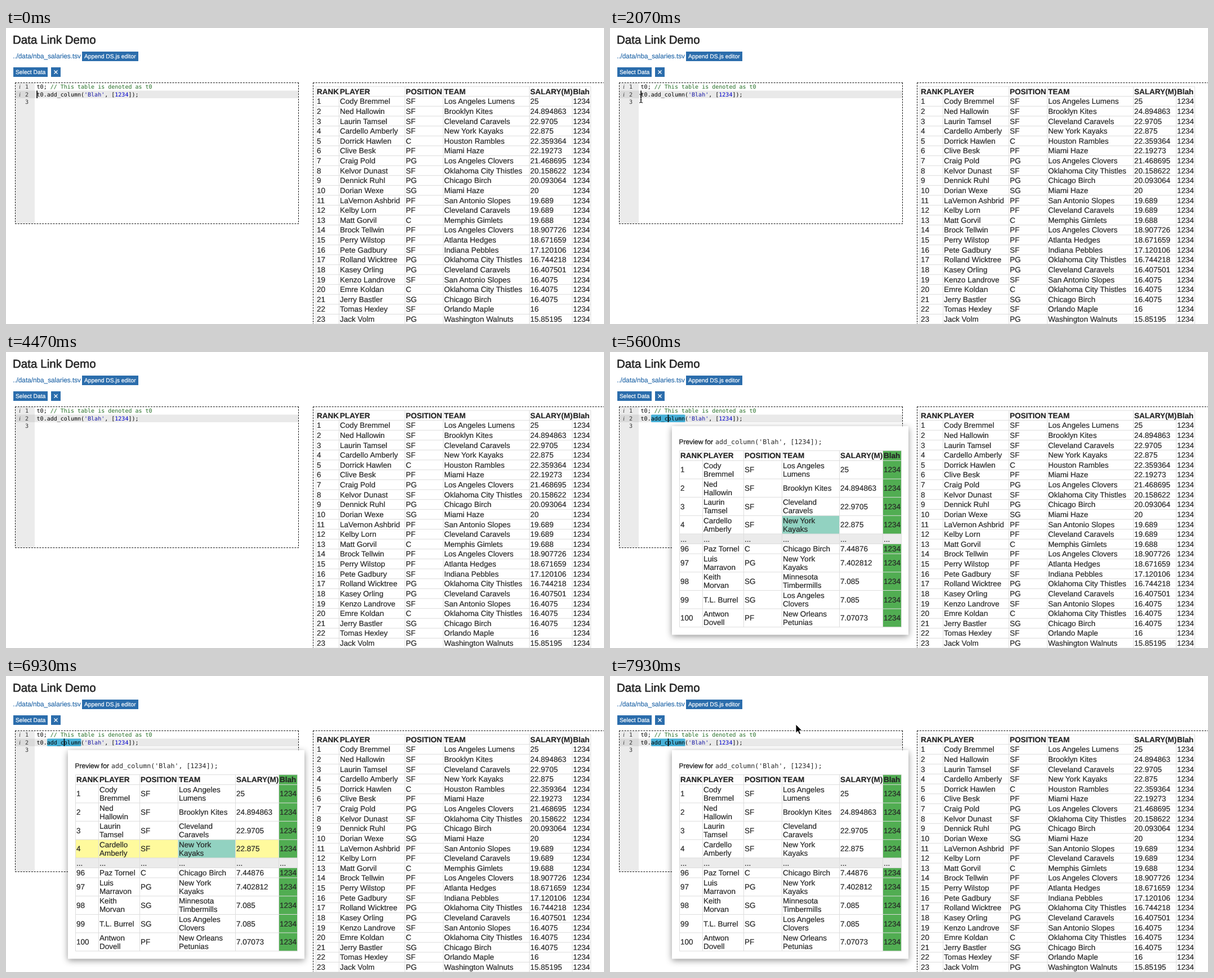
These frames come from a looping animation (1062 by 527 pixels, 8000 ms). An HTML page:

```html
<!DOCTYPE html>
<html lang="en">
<head>
<meta charset="utf-8">
<title>Data Link Demo</title>
<style>
html, body { margin: 0; width: 100%; height: 100%; overflow: hidden; background: #fff; }
svg { display: block; width: 1062px; height: 527px; }
text {
  font: 13.5px "Liberation Sans", Arial, sans-serif; white-space: pre;
  text-rendering: geometricPrecision; fill: #262626; stroke: #262626; stroke-width: .2;
}
.b { font-weight: 700; }
.code { font: 10.03px "DejaVu Sans Mono", monospace; fill: #000; stroke: none; }
.com { fill: #236e24; }
.str { fill: #1a1aa6; }
.num { fill: #0000cd; }
.link { font-size: 11.77px; fill: #2a6cab; stroke: #2a6cab; }
.btn { font-size: 10.3px; fill: #fff; stroke: #fff; }
.grid { stroke: #ddd; fill: none; }
.dash { stroke: #111; fill: none; stroke-dasharray: 2.9 1.92; }
#pop > .card { fill: #fff; filter: drop-shadow(0 3px 6px rgba(0,0,0,.42)); }
</style>
</head>
<body>
<svg id="stage" viewBox="0 0 1062 527"></svg>
<script>
const LOOP = 8000, ROW = 17.63, LINE = 15;
const HEAD = ["RANK", "PLAYER", "POSITION", "TEAM", "SALARY(M)", "Blah"];

const TABLE = `Cody Bremmel|SF|Los Angeles Lumens|25
Ned Hallowin|SF|Brooklyn Kites|24.894863
Laurin Tamsel|SF|Cleveland Caravels|22.9705
Cardello Amberly|SF|New York Kayaks|22.875
Dorrick Hawlen|C|Houston Rambles|22.359364
Clive Besk|PF|Miami Haze|22.19273
Craig Pold|PG|Los Angeles Clovers|21.468695
Kelvor Dunast|SF|Oklahoma City Thistles|20.158622
Dennick Ruhl|PG|Chicago Birch|20.093064
Dorian Wexe|SG|Miami Haze|20
LaVernon Ashbrid|PF|San Antonio Slopes|19.689
Kelby Lorn|PF|Cleveland Caravels|19.689
Matt Gorvil|C|Memphis Gimlets|19.688
Brock Tellwin|PF|Los Angeles Clovers|18.907726
Perry Wilstop|PF|Atlanta Hedges|18.671659
Pete Gadbury|SF|Indiana Pebbles|17.120106
Rolland Wicktree|PG|Oklahoma City Thistles|16.744218
Kasey Orling|PG|Cleveland Caravels|16.407501
Kenzo Landrove|SF|San Antonio Slopes|16.4075
Emre Koldan|C|Oklahoma City Thistles|16.4075
Jerry Bastler|SG|Chicago Birch|16.4075
Tomas Hexley|SF|Orlando Maple|16
Jack Volm|PG|Washington Walnuts|15.85195`
  .split("\n").map((r, i) => [i + 1, ...r.split("|"), 1234]);

// "/" marks a wrapped line inside a cell
const PREVIEW = `1|Cody/Bremmel|SF|Los Angeles/Lumens|25
2|Ned/Hallowin|SF|Brooklyn Kites|24.894863
3|Laurin/Tamsel|SF|Cleveland/Caravels|22.9705
4|Cardello/Amberly|SF|New York/Kayaks|22.875
...|...|...|...|...
96|Paz Tornel|C|Chicago Birch|7.44876
97|Luis/Marravon|PG|New York/Kayaks|7.402812
98|Keith/Morvan|SG|Minnesota/Timbermills|7.085
99|T.L. Burrel|SG|Los Angeles/Clovers|7.085
100|Antwon/Dovell|PF|New Orleans/Petunias|7.07073`
  .split("\n").map(r => r.split("|")).map(r => [...r, r[0] === "..." ? "..." : 1234]);

const rect = (x, y, w, h, fill, more = "") =>
  `<rect x="${x}" y="${y}" width="${w}" height="${h}" fill="${fill}" ${more}/>`;
const text = (x, y, s, cls = "", style = "") =>
  `<text x="${x}" y="${y}" class="${cls}" style="${style}">${s}</text>`;

function cell(x, mid, value, cls) {
  const lines = String(value).split("/");
  return lines.map((s, i) =>
    text(x, mid + 4.8 + (i - (lines.length - 1) / 2) * LINE, s, cls)).join("");
}

// Draws a table; cols holds the column borders, tops the row borders.
function table(cols, tops, rows) {
  const end = tops[rows.length], right = cols[6];
  const lines = cols.map(x => `M${x} ${tops[0]}V${end}`).join("") +
    tops.map(y => `M${cols[0]} ${y}H${right}`).join("");
  const cells = rows.map((r, i) => r.map((v, c) =>
    cell(cols[c] + 1.6, (tops[i] + tops[i + 1]) / 2, v, i ? "" : "b")).join(""));
  return `<path class="grid" d="${lines}"/>` + cells.join("");
}

const mainTops = Array.from({ length: 25 }, (_, i) => 104 + i * ROW);
const popTops = [175.7];
[HEAD, ...PREVIEW].forEach(r => popTops.push(
  popTops.at(-1) + (r.some(v => String(v).includes("/")) ? 32.65 : ROW)));
const popCols = [123.5, 164.5, 237.5, 305.5, 407.5, 484.5, 517.5];
const span = i => [popTops[i], popTops[i + 1] - popTops[i]];
const band = (x, w, i, fill, more = "") => rect(x, span(i)[0], w, span(i)[1], fill, more);

const call = `('Blah', [1234]);`;
const page =
  text(12, 28.3, "Data Link Demo", "", "font-size:20.6px;stroke-width:.6") +
  text(12, 53.7, "../data/nba_salaries.tsv", "link") +
  rect(135, 42, 100, 17, "#2b6dac") + text(139, 54, "Append DS.js editor", "btn") +
  rect(13, 70, 61, 17, "#2b6dac") + text(17, 82, "Select Data", "btn") +
  rect(80, 70, 17, 17, "#2b6dac") +
  `<path d="M85.5 75.5l6 6m0-6l-6 6" stroke="#fff" stroke-width="1.3"/>`;

const editor =
  rect(17, 98, 34, 250, "#ebebeb") + rect(17, 111.5, 34, 13.5, "#dadada") +
  rect(51, 111.5, 468, 13.5, "#e9e9e9") +
  rect(73, 111.5, 60.5, 13.5, "#47b1d8", 'id="token" rx="1.5"') +
  [1, 2, 3].map(n => text(34, 94.6 + n * 13.45, n, "code", "fill:#333") +
    (n < 3 ? text(23, 94.6 + n * 13.45, "i", "code",
      "font:italic 10px 'DejaVu Serif','Noto Serif',serif;fill:#444") : "")).join("") +
  text(54.6, 108, `t0; <tspan class="com">// This table is denoted as t0</tspan>`, "code") +
  text(54.6, 121.5, `t0.add_column(<tspan class="str">'Blah'</tspan>, [<tspan class="num">1234</tspan>]);`, "code") +
  rect(0, 111.5, 1.6, 13.5, "#000", 'id="caret"') +
  `<path class="dash" d="M16 97.5H520M16 348.5H520M16.5 97V349M519.5 97V349"/>`;

const popup = `<g id="pop">` +
  rect(110, 132, 420, 371.5, "#fff", 'class="card"') +
  text(122.5, 163.7, "Preview for", "", "font-size:12.1px;stroke-width:.35") +
  text(187, 163.7, "add_column" + call, "code", "font-size:11.68px;fill:#262626") +
  band(123.5, 394, 5, "#ebebeb") +
  band(123.5, 361, 4, "#fffa9d", 'id="glow"') +
  band(305.5, 102, 4, "#92d2c1", 'id="hot"') +
  rect(484.5, popTops[0], 33, popTops[5] - popTops[0], "#51ad52") +
  rect(484.5, popTops[6], 33, popTops[11] - popTops[6], "#51ad52") +
  table(popCols, popTops, [HEAD, ...PREVIEW]) + `</g>`;

const pointers = `<g id="mouse">
  <path id="arrow" d="M0 0V15.5L3.6 12.2 6 17.8 8.6 16.7 6.3 11.2H11Z" fill="#000" stroke="#fff"/>
  <path id="beam" d="M-3-7.5Q0-7.5 0-5V5Q0 7.5-3 7.5M3-7.5Q0-7.5 0-5M0 5Q0 7.5 3 7.5M-2 2.5H2"
    fill="none" stroke="#222" stroke-width="1.2"/>
  <path id="hand" d="M-1.5 1Q0-1 1.5 1L2.2 6Q4-.2 5 5.4Q6.6 4 7.3 6Q9.4 5 9.8 7.5Q10 11 8.3 14V17.5H.5V15.5Q-2 12.5-3.8 9.5Q-4.2 7.5-2 8.2L-.4 10Z"
    fill="#fff" stroke="#000" stroke-linejoin="round"/></g>`;

document.getElementById("stage").innerHTML = page + editor +
  `<path class="dash" d="M545 97.5H1066M545.5 97V530"/>` +
  table([550.5, 591.5, 708.5, 776.5, 929.5, 1005.5, 1038.5], mainTops, [HEAD, ...TABLE]) +
  popup + pointers;

const el = id => document.getElementById(id);
const show = (id, on) => el(id).style.display = on ? "" : "none";

// Times of the right-arrow key presses, one column each
const KEYS = [2870, 3030, 3200, 3400, 3600, 3730, 3970, 4500];
const CLICK = 1670, POP = 5470;
// Pointer path: time, x, y
const PATH = [[870, 12, 34], [1670, 55, 125.5], [2100, 55, 125.5], [2470, 345, 308],
  [7130, 345, 308], [7270, 311, 200], [7420, 313, 197], [7930, 330, 86], [8000, 330, 86]];

function pointer(t) {
  const i = Math.max(1, PATH.findIndex(p => p[0] > t));
  const [a, b] = [PATH[i - 1], PATH[i]];
  const k = Math.max(0, Math.min(1, (t - a[0]) / (b[0] - a[0])));
  return [a[1] + (b[1] - a[1]) * k, a[2] + (b[2] - a[2]) * k];
}

function draw(t) {
  const col = KEYS.filter(k => k <= t).length;
  const from = col ? KEYS[col - 1] : CLICK;
  show("caret", (t - from + 10 * LOOP) % 1000 < 500);
  el("caret").setAttribute("x", 54.3 + col * 6.04);

  const open = t >= POP;
  show("pop", open);
  show("token", open);

  const [x, y] = pointer(t);
  const row = popTops.findIndex((top, i) => y >= top && y < popTops[i + 1]);
  const over = open && row > 0;
  show("hot", over);
  show("glow", over);
  if (over) {
    for (const id of ["hot", "glow"]) {
      el(id).setAttribute("y", span(row)[0]);
      el(id).setAttribute("height", span(row)[1]);
    }
    const since = t - (row === 4 ? 5600 : 7200);
    el("glow").setAttribute("opacity", Math.max(0, Math.min(1, since / 500)));
  }

  const inEditor = !open && x > 51 && x < 519 && y > 98 && y < 348;
  show("mouse", (t >= 870 && t < KEYS[0]) || t > 7140);
  el("mouse").setAttribute("transform", `translate(${x} ${y})`);
  show("hand", over);
  show("beam", inEditor);
  show("arrow", !over && !inEditor);
}

const start = performance.now();
function tick() {
  draw((performance.now() - start) % LOOP);
  requestAnimationFrame(tick);
}
tick();
</script>
</body>
</html>
```
